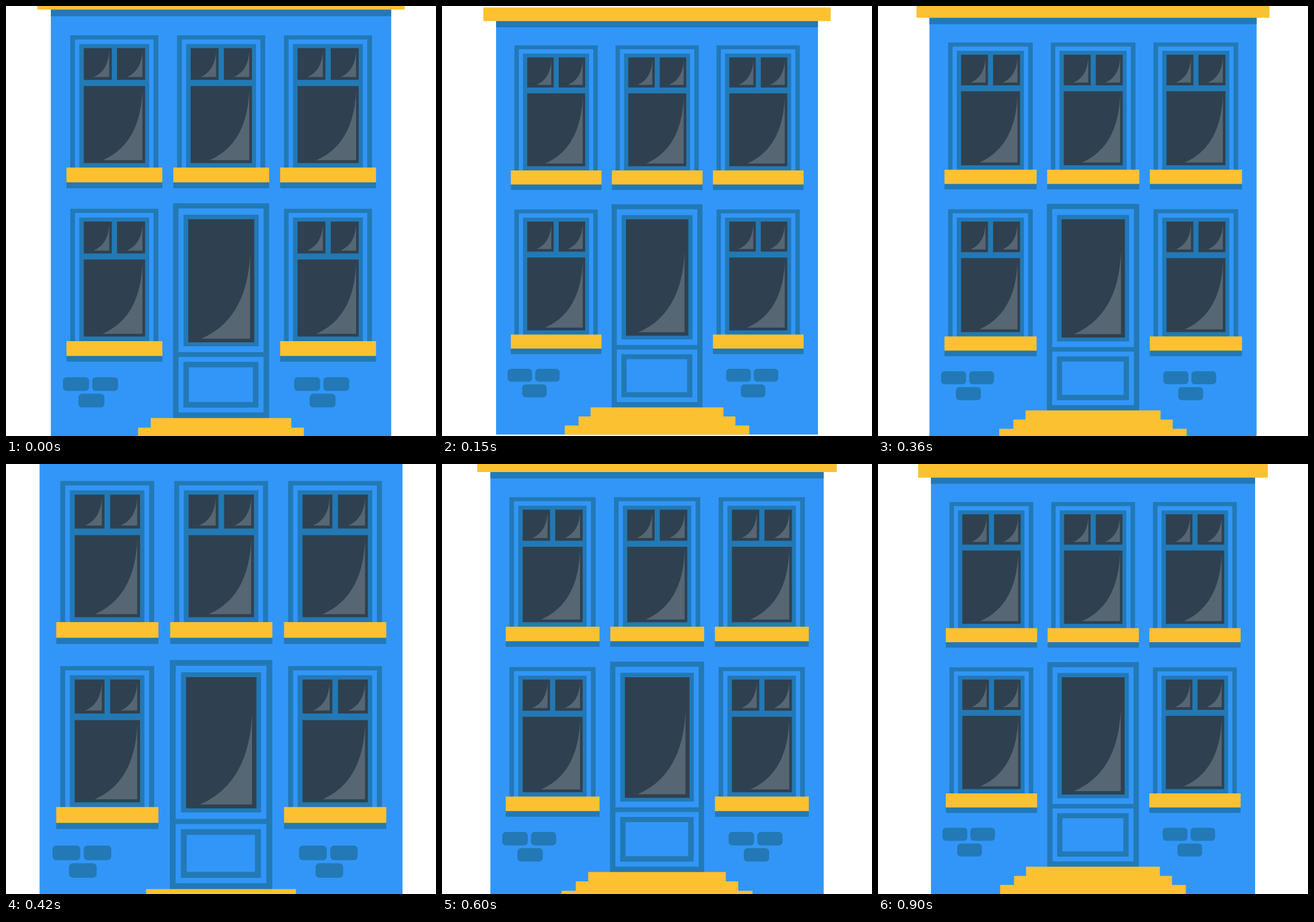
An HTML page that plays this animation: 748x748 px, repeating every 0.93 s.

```html
<!DOCTYPE html>
<html lang="en">
<head>
<meta charset="utf-8">
<title>Beating house</title>
<style>
  html, body { margin: 0; height: 100%; overflow: hidden; background: #fff; }
  svg { display: block; width: 100%; height: 100%; }
  .wall { fill: #3296f8; }
  .trim { fill: #2279b5; }
  .gold { fill: #fbc131; }
  .glass { fill: #2f4150; }
  .glare { fill: #566673; }
</style>
</head>
<body>
<svg viewBox="0 0 748 748">
  <defs>
    <g id="window">
      <path class="trim" d="M124.3 66.3H270.2V286H124.3z"/>
      <path class="wall" d="M132 73.2H262.3V286H132z"/>
      <path class="trim" d="M139.2 80.8H255V286H139.2z"/>
      <path class="glass" d="M146.7 87.5H193V140.2H146.7zM201.8 87.5H248.2V140.2H201.8zM146.7 150.4H248.2V278H146.7z"/>
      <path class="glare" d="M188.8 92Q187.5 125 163 135.5H188.8zM243.8 92Q242.5 125 218 135.5H243.8zM243.8 157Q240.5 246 178 273.3H243.8z"/>
      <path class="trim" d="M118 309H276.8V319.6H118z"/>
      <path class="gold" d="M118 285.5H276.8V310H118z"/>
    </g>
    <g id="bricks" class="trim">
      <rect x="112.2" y="632.8" width="43.2" height="22.7" rx="6"/>
      <rect x="160.7" y="632.8" width="42.7" height="22.7" rx="6"/>
      <rect x="137.8" y="660.3" width="43" height="22.5" rx="6"/>
    </g>
  </defs>
  <g id="house">
    <path class="wall" d="M92.1 20H656V748H92.1z"/>
    <path class="trim" d="M92.1 20H656V34.6H92.1z"/>
    <path class="gold" d="M69.8 0H678.2V23.8H69.8z"/>
    <use href="#window"/>
    <use href="#window" x="177"/>
    <use href="#window" x="354"/>
    <use href="#window" y="287.5"/>
    <use href="#window" x="354" y="287.5"/>
    <use href="#bricks"/>
    <use href="#bricks" x="383"/>
    <path class="trim" d="M294.5 344.6H453.7V702H294.5z"/>
    <path class="wall" d="M303.6 353.4H444.5V591.2H303.6zM303.6 599.2H444.5V691.2H303.6z"/>
    <path class="trim" d="M312 363.6H436.3V581.5H312zM311.7 607.4H436V683H311.7z"/>
    <path class="glass" d="M319.7 371.1H429V575H319.7z"/>
    <path class="glare" d="M422.2 427Q418 536 341.3 568.9H422.2z"/>
    <path class="wall" d="M320.8 616.3H426.8V673.7H320.8z"/>
    <path class="gold" d="M257.6 700.5H490.4V716.4H511.4V732.3H535.6V748H212.4V732.3H236.6V716.4H257.6z"/>
  </g>
</svg>
<script>
  const house = document.getElementById("house");
  const STEP = 30, LAST = 30;
  const beat = [[0, 1.05], [.05, 1.25], [.39, .9], [.45, 1.15], [.6, 1.05], [1, 1]];

  const bezier = (a, b, t) => 3 * (1 - t) ** 2 * t * a + 3 * (1 - t) * t * t * b + t ** 3;

  // cubic-bezier(.215, .61, .355, 1), solved by bisection
  function easeOut(x) {
    let lo = 0, hi = 1;
    for (let i = 0; i < 24; i++) {
      const mid = (lo + hi) / 2;
      if (bezier(.215, .355, mid) < x) lo = mid; else hi = mid;
    }
    return bezier(.61, 1, hi);
  }

  function scaleAt(u) {
    const i = beat.findIndex(([time]) => time >= u) || 1;
    const [t0, s0] = beat[i - 1], [t1, s1] = beat[i];
    return u === t0 ? s0 : s0 + (s1 - s0) * easeOut((u - t0) / (t1 - t0));
  }

  function draw(now) {
    const tick = Math.floor(now / STEP) % (LAST + 1);
    const s = scaleAt(tick / LAST);
    house.setAttribute("transform", `translate(374 374) scale(${s}) translate(-374 -374)`);
    requestAnimationFrame(draw);
  }
  draw(performance.now());
</script>
</body>
</html>
```
